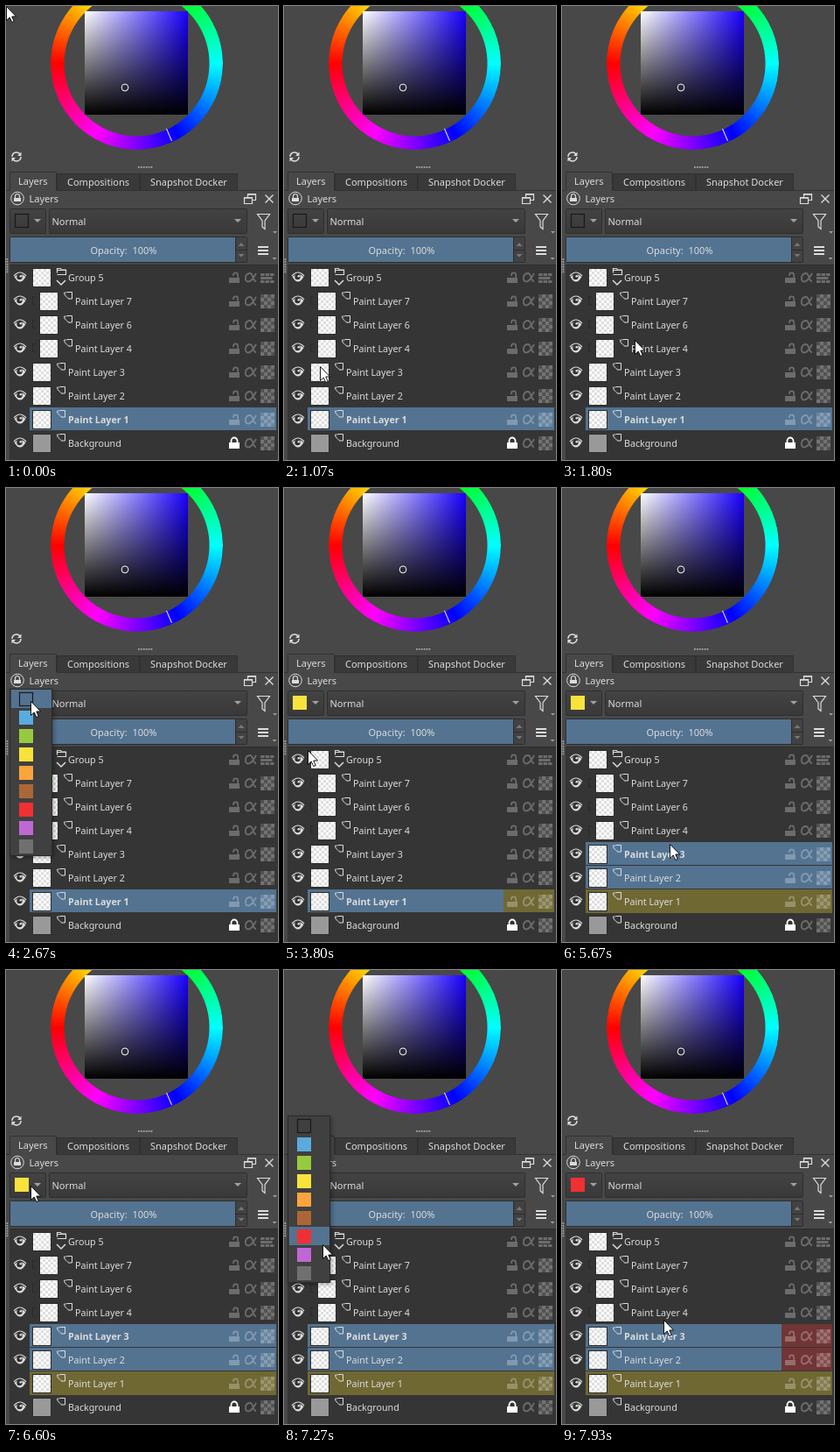
These frames come from a looping animation (311 by 518 pixels, 8000 ms). An HTML page:

```html
<!DOCTYPE html>
<html lang="en">
<head>
<meta charset="utf-8">
<title>Layer colour labels</title>
<style>
  html, body { margin: 0; width: 100%; height: 100%; overflow: hidden; background: #484848; }
  #wheel {
    position: absolute; left: 51px; top: -33px; width: 197px; height: 197px; border-radius: 50%;
    background: conic-gradient(from 270deg, red, yellow, lime, cyan, blue, magenta, red);
    -webkit-mask: radial-gradient(circle, transparent 82.5px, #000 83.5px);
    mask: radial-gradient(circle, transparent 82.5px, #000 83.5px);
  }
  #shade {
    position: absolute; left: 90px; top: 6px; width: 118px; height: 118px;
    background: linear-gradient(transparent, #000), linear-gradient(90deg, #fff, #1800ff);
  }
  svg { position: absolute; left: 0; top: 0; display: block; }
  text { font: 11px "Noto Sans", "Open Sans", sans-serif; fill: #dcdcdc; white-space: pre; }
  .layer { font-size: 10.7px; }
  .active { font-weight: 600; }
</style>
</head>
<body>
<div id="wheel"></div>
<div id="shade"></div>
<svg id="stage" width="311" height="518" viewBox="0 0 311 518">
  <defs>
    <pattern id="paper" width="6" height="6" patternUnits="userSpaceOnUse">
      <path d="M0 0h6v6h-6z" fill="#fff"/><path d="M0 0h3v3h-3zM3 3h3v3h-3z" fill="#dedede"/>
    </pattern>
    <linearGradient id="button" x2="0" y2="1">
      <stop stop-color="#434343"/><stop offset="1" stop-color="#393939"/>
    </linearGradient>
  </defs>
  <g id="fixed"></g>
  <g id="live"></g>
</svg>
<script>
const LOOP = 8000, BLUE = '#537391', LIGHT = '#dcdcdc';
const LABELS = ['none', '#5baade', '#97ca3e', '#f8e33c', '#fca43c', '#ad6737', '#f13034', '#c067d6', '#707070'];
const YELLOW = 3, RED = 6;
const ROW_TINT = { [YELLOW]: '#706833', [RED]: '#713535' };
const LAYERS = ['Group 5', 'Paint Layer 7', 'Paint Layer 6', 'Paint Layer 4',
  'Paint Layer 3', 'Paint Layer 2', 'Paint Layer 1', 'Background'];

// Pointer moves: start, end, control x, y, end x, y
const MOVES = [
  [599, 600, 17, 79, 17, 79], [600, 730, 11, 150, 11, 229],
  [999, 1000, 34, 394, 34, 394], [1000, 1270, 45, 430, 69, 443],
  [1400, 1600, 90, 465, 107, 456], [1600, 1800, 110, 410, 83, 381],
  [1800, 2130, 60, 260, 30, 234], [2130, 2330, 28, 238, 28, 243],
  [3000, 3130, 45, 300, 56, 403], [3130, 3270, 50, 340, 27, 299],
  [3800, 4200, 40, 400, 91, 445], [4600, 4800, 105, 430, 119, 419],
  [5000, 5330, 137, 396, 124, 405], [5470, 5800, 124, 398, 121, 418],
  [6200, 6600, 60, 270, 28, 246],
  [7060, 7200, 48, 290, 56, 333], [7200, 7330, 48, 310, 28, 304],
  [7600, 7930, 70, 560, 116, 399]
];

const rect = (x, y, w, h, fill, extra = '') =>
  `<rect x="${x}" y="${y}" width="${w}" height="${h}" fill="${fill}" ${extra}/>`;
const fillPath = (d, fill = LIGHT, extra = '') => `<path d="${d}" fill="${fill}" ${extra}/>`;
const line = (d, color = LIGHT, width = 1, extra = '') =>
  `<path d="${d}" fill="none" stroke="${color}" stroke-width="${width}" ${extra}/>`;
const disc = (x, y, r, fill, extra = '') => `<circle cx="${x}" cy="${y}" r="${r}" fill="${fill}" ${extra}/>`;
const label = (x, y, text, cls = '') => `<text x="${x}" y="${y}" class="${cls}">${text}</text>`;
const down = (x, y, r, color = '#a0a0a0') => fillPath(`M${x - r} ${y}h${2 * r}l${-r} ${r}z`, color);
const box = (x, y, w, h, fill) => rect(x + .5, y + .5, w - 1, h - 1, fill, 'stroke="#2e2e2e" rx="1"');
const dots = (x, y, dx, dy) => Array.from({ length: 6 }, (_, i) =>
  rect(x + i * dx, y + i * dy, 1.8, 1.8, '#a5a5a5')).join('');

function drawFixed() {
  const tabs = rect(58.5, 191.5, 94, 19, '#393939', 'stroke="#303030"') +
    rect(153.5, 191.5, 111, 19, '#393939', 'stroke="#303030"') +
    line('M0 210.5H4.5V189.5H57.5V210.5H311', '#323232') + rect(5, 190, 52, 22, '#484848') +
    label(14, 204, 'Layers') + label(70, 205, 'Compositions') + label(165, 205, 'Snapshot Docker');
  const picker = line('M183.5 140L189.5 154', '#fff') +
    disc(136, 93, 4.8, 'none', 'stroke="#111"') +
    disc(136, 93, 3.8, 'none', 'stroke="#ddd" stroke-width="1.3"');
  const refresh = line('M7 172a5 5 0 0 1 9-3M17 172a5 5 0 0 1-9 3', LIGHT, 1.5) +
    fillPath('M17.5 166.5v4.5h-4.5zM6.5 177.5v-4.5h4.5z');
  const title = disc(13, 219.5, 7.3, 'none', 'stroke="#dcdcdc"') +
    rect(9, 219, 8, 4, LIGHT) + line('M10.5 219v-2a2.5 2.5 0 0 1 5 0v2', LIGHT, 1.2) +
    label(26.5, 224, 'Layers') +
    line('M276.5 218v-3.5h9v7h-4M272.5 218.5h9v7h-9zM276 215.2h10M272 219.2h10', LIGHT, 1.2) +
    line('M296.5 215.5l9 9M305.5 215.5l-9 9', LIGHT, 1.4);
  const controls = box(49, 231, 227, 29, 'url(#button)') + label(52.5, 250, 'Normal') + down(265, 243, 4) +
    line('M287.5 237.5h14l-5.5 7.5v9.5l-3-2.5v-7z', LIGHT, 1.2) + down(307.5, 257, 2.5) +
    box(4, 263, 272, 30, '#424242') + rect(5, 264, 257, 28, BLUE) + label(96.5, 283, 'Opacity:  100%') +
    line('M262.5 264v28M263 278.5h12', '#2d2d2d') +
    fillPath('M265.5 274h7l-3.5-4z', '#777') + down(269, 283, 3.5, '#777') +
    [274, 278, 282].map(y => rect(288, y, 12, 2, LIGHT)).join('') + down(307, 287, 2.5);
  return picker + refresh + dots(151, 183, 2.9, 0) + tabs + title + controls +
    rect(4, 296, 307, 222, '#353535') + line('M4 295.5H311', '#2d2d2d') + dots(.5, 288, 0, 2.9);
}

function eye(y) {
  return fillPath(`M9.5 ${y}Q16 ${y - 6} 22.5 ${y}Q16 ${y + 11} 9.5 ${y}z`) +
    disc(15.5, y, 3.2, '#303030') + disc(16.8, y - .8, 1.3, LIGHT) +
    line(`M9 ${y - 1}Q16 ${y - 9} 23 ${y - 1}`, LIGHT, 1.2);
}

function sideIcons(y, i) {
  const dim = 'opacity=".27"';
  const lock = i === 7
    ? rect(255, y - 1, 12, 7, '#fff') + line(`M257.5 ${y - 1}v-2a3.5 3.5 0 0 1 7 0v2`, '#fff', 1.8)
    : `<g ${dim}>${rect(255, y, 12, 6, '#fff')}${line(`M260 ${y - 2}v-1a2.6 2.6 0 0 1 5.2 0v3`, '#fff', 1.7)}</g>`;
  const alpha = line(`M286 ${y - 5}C282 ${y + 2} 280 ${y + 4.5} 277 ${y + 4.5}C272 ${y + 4.5} 273 ${y - 5} 279 ${y - 5}C283 ${y - 5} 282 ${y + 4.5} 286 ${y + 4}`,
    '#fff', 1.8, dim);
  let grid = '';
  if (i === 0) {
    for (let r = 0; r < 3; r++)
      for (let c = 0; c < 3; c++)
        grid += rect(291 + c * 5.5 - (r % 2) * c, y - 5 + r * 4, 4.5, 3, '#fff', dim);
  } else {
    for (let n = 0; n < 16; n++) {
      const c = n % 4, r = Math.floor(n / 4);
      grid += rect(291 + c * 4, y - 8 + r * 4, 4, 4, '#fff', `opacity="${(r + c) % 2 ? .3 : .14}"`);
    }
  }
  return lock + alpha + grid;
}

function row(name, i, state) {
  const top = 296 + i * 27, y = top + 14;
  const indent = i > 0 && i < 4 ? 8 : 0;
  const tint = ROW_TINT[state.labels[i]], selected = state.selected.includes(i);
  let out = '';
  if (tint) out += rect(27, top, 282, selected ? 26 : 27, tint);
  if (selected) out += rect(27, top, tint ? 224 : 282, 26, BLUE);
  if (indent) out += line(`M33.5 ${y - 5.5}h-3v9h3`, '#292929');
  const thumb = rect(-.5, -.5, 21, 21, i === 7 ? '#999' : 'url(#paper)', 'stroke="#2c2c2c"');
  out += eye(y - 1) + `<g transform="translate(${31 + indent} ${top + 4})">${thumb}</g>`;
  const x = 58.5 + indent, t = y - 10.5;
  out += i === 0
    ? line(`M58.5 ${y - 5.5}v-5h4l1 1.5h5v5.5h-10M58 ${y - 8.5}h10`, LIGHT, 1.2) + line(`M58 ${y + 3}l5 5 5-5`, LIGHT, 1.5)
    : line(`M${x + 3} ${t}h6v7.5h-4M${x} ${t + .5}q0 3.5 2.5 4.5l3 3`, LIGHT, 1) +
      line(`M${x} ${t + .5}h3`, LIGHT, .8);
  return out + label(71 + indent, y + 4, name, state.active === i ? 'layer active' : 'layer') + sideIcons(y, i);
}

function swatch(cx, cy, id) {
  return id ? rect(cx - 8, cy - 8, 16, 16, LABELS[id])
    : rect(cx - 7.5, cy - 7.5, 15, 15, 'none', 'stroke="#191919" stroke-width="1.2"');
}

function popup(y, hover) {
  let out = rect(4.5, y + .5, 48, 190, '#404040', 'stroke="#2a2a2a" style="filter:drop-shadow(2px 2px 2px rgba(0,0,0,.3))"');
  out += rect(6, y + 1 + hover * 21, 46, 21, BLUE);
  return out + LABELS.map((_, i) => swatch(23, y + 12 + i * 21, i)).join('');
}

function pointerAt(T) {
  if (T < 130) return [0, 0];
  if (T < 600 || (T >= 800 && T < 1000)) return null;
  let x = 0, y = 0;
  for (const [t0, t1, cx, cy, ex, ey] of MOVES) {
    if (T < t0) break;
    const u = Math.min(1, (T - t0) / (t1 - t0)), v = 1 - u;
    x = v * v * x + 2 * u * v * cx + u * u * ex;
    y = v * v * y + 2 * u * v * cy + u * u * ey;
  }
  return [Math.round(x), Math.round(y)];
}

function stateAt(T) {
  const labels = {};
  if (T >= 3800) labels[6] = YELLOW;
  if (T >= 7600) labels[4] = labels[5] = RED;
  return {
    labels,
    current: T < 3800 ? 0 : T < 7600 ? YELLOW : RED,
    selected: T < 4600 ? [6] : T < 5470 ? [5] : [4, 5],
    active: T < 4600 ? 6 : T < 5470 ? 5 : 4,
    // The open list lays its current entry over the button
    menu: T >= 2670 && T < 3800 ? 229 : T >= 6730 && T < 7600 ? 166 : null
  };
}

function draw(T) {
  const state = stateAt(T), at = pointerAt(T);
  let out = box(4, 231, 42, 29, 'url(#button)') + swatch(18, 245, state.current) + down(36, 243, 4);
  out += LAYERS.map((name, i) => row(name, i, state)).join('');
  if (state.menu !== null) {
    const hover = Math.floor((at[1] - state.menu - 1) / 21);
    out += popup(state.menu, Math.max(0, Math.min(8, hover)));
  }
  if (at) out += fillPath('M.5.5V16.5L4.2 13L6.8 18.5L9.2 17.5L6.8 12H11.6Z', '#fff',
    `stroke="#000" stroke-width=".9" transform="translate(${at})"`);
  document.getElementById('live').innerHTML = out;
}

document.getElementById('fixed').innerHTML = drawFixed();
const start = performance.now();
let shown = -1;
function tick() {
  const t = (performance.now() - start) % LOOP;
  const T = Math.round(Math.floor((t + 5) * 3 / 200) * 20 / 3) * 10 % LOOP;
  if (T !== shown) draw(shown = T);
  requestAnimationFrame(tick);
}
tick();
</script>
</body>
</html>
```
